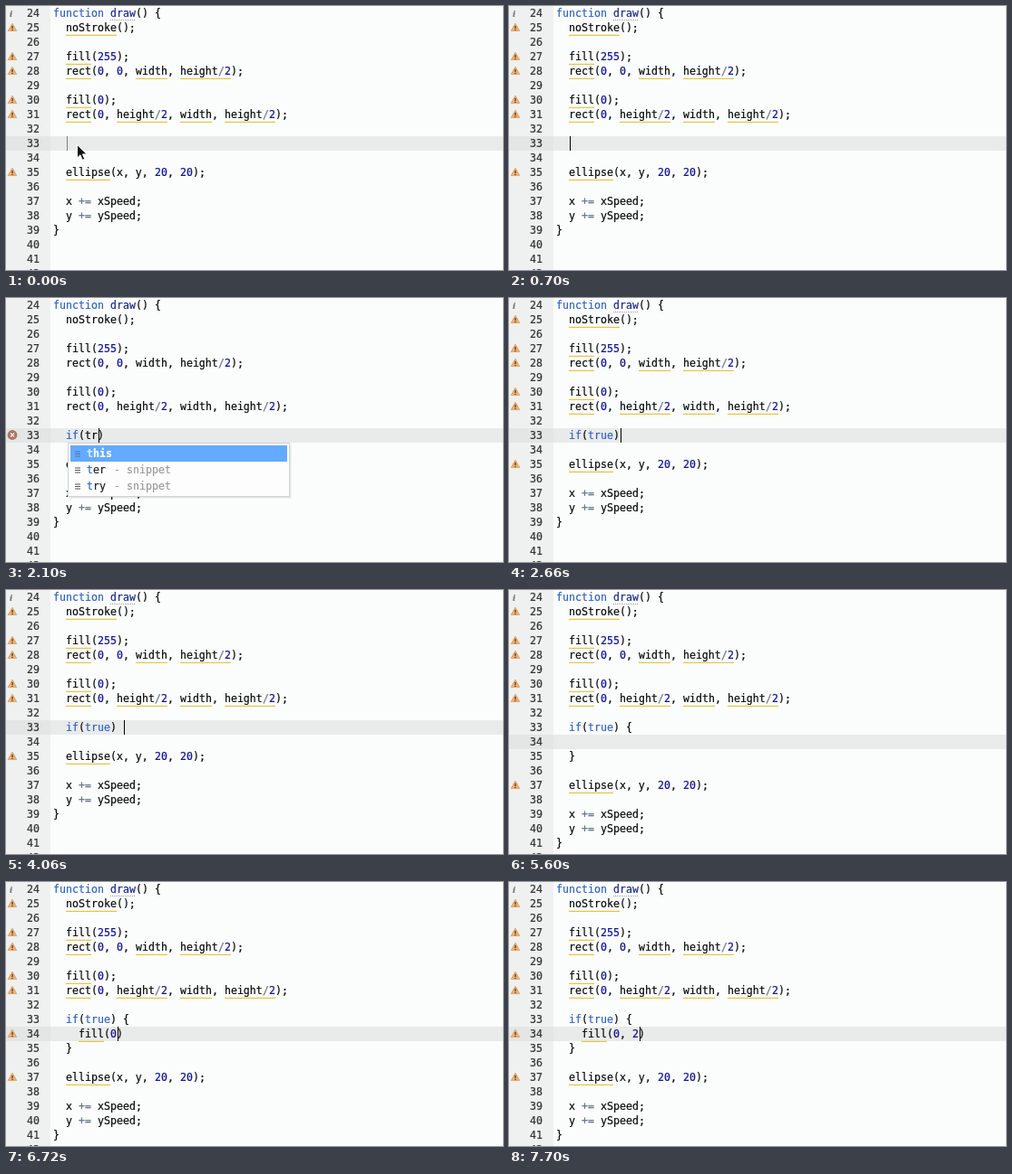
Write an HTML page that moves like this. It is 548 by 292 pixels and loops after 8 s.

```html
<!DOCTYPE html>
<html lang="en">
<head>
<meta charset="utf-8">
<title>Code editor</title>
<style>
  html, body { margin: 0; width: 100%; height: 100%; overflow: hidden; background: #fbfdfc; }
  svg { display: block; width: 548px; height: 292px; }
  text { font: 11.627px "DejaVu Sans Mono", monospace; white-space: pre; stroke-width: .2px; }
  .bold { font-weight: bold; }
  .info { font: italic bold 11px "Liberation Serif", serif; }
</style>
</head>
<body>
<svg id="stage" viewBox="0 0 548 292"></svg>
<script>
const LOOP = 8000, FIRST_ROW = 24, ROW_H = 16, CHAR_W = 7, CODE_X = 52;
const stage = document.getElementById('stage');

const HEAD = ['function draw() {', '  noStroke();', '', '  fill(255);', '  rect(0, 0, width, height/2);',
  '', '  fill(0);', '  rect(0, height/2, width, height/2);', ''];
const TAIL = ['', '  ellipse(x, y, 20, 20);', '', '  x += xSpeed;', '  y += ySpeed;', '}'];
const COLORS = { function: '#3163be', if: '#3163be', true: '#3163be', draw: '#1c2a86', '+=': '#687687', '/': '#687687' };
const TOKENS = /(\bfunction\b|\bdraw\b|\bif\b|\btrue\b|\d+|\+=|\/)/;
const FLAGGED = /noStroke|fill|rect|ellipse|width|height\/2/g;

const block = line => ['  if(true) {', '    ' + line, '  }'];
const popup = (col, matched, ...items) => ({ col, matched, items });
const ifList = popup(2, 2, 'if - EcmaScript', 'ife - snippet');
const tList = popup(5, 1, 'this', 'ter - snippet', 'try - snippet');
const trList = popup(5, 1, 'ter - snippet', 'try - snippet');
const fillList = popup(4, 2, 'fill');

// Each step changes only the listed parts of the state.
const STEPS = [
  [0, { mid: ['  '], row: 33, col: 2, caret: .45, mouse: true, list: null, error: 0, midLint: false, iconLag: 0 }],
  [140, { mouse: false, caret: .2 }],
  [280, { caret: 0 }],
  [560, { caret: .5 }],
  [700, { caret: 1 }],
  [980, { mid: ['  i'], col: 3 }],
  [1120, { mid: ['  if'], col: 4, list: ifList }],
  [1260, { error: 35 }],
  [1680, { mid: ['  if()'], col: 5, list: null }],
  [1820, { error: 33 }],
  [1960, { mid: ['  if(t)'], col: 6 }],
  [2100, { mid: ['  if(tr)'], col: 7, list: tList }],
  [2240, { mid: ['  if(tru)'], col: 8, list: trList }],
  [2380, { mid: ['  if(true)'], col: 9, list: null }],
  [2520, { col: 10 }],
  [2660, { error: 0 }],
  [3360, { caret: .5 }],
  [3500, { caret: 0 }],
  [3640, { caret: .5 }],
  [3780, { caret: 1 }],
  [4060, { mid: ['  if(true) '], col: 11 }],
  [4620, { mid: ['  if(true) {}'], col: 12 }],
  [4760, { mid: block(''), row: 34, col: 4, iconLag: 2 }],
  [5040, { iconLag: 0 }],
  [5460, { caret: .4 }],
  [5600, { caret: 0 }],
  [5740, { mid: block('f'), col: 5, caret: 1 }],
  [5880, { mid: block('fi'), col: 6, list: fillList }],
  [6020, { mid: block('fil'), col: 7 }],
  [6160, { mid: block('fill'), col: 8, list: null }],
  [6300, { mid: block('fill()'), col: 9 }],
  [6580, { mid: block('fill(0)'), col: 10 }],
  [6720, { midLint: true }],
  [7000, { mid: block('fill(0,)'), col: 11 }],
  [7280, { mid: block('fill(0, )'), col: 12, error: 34 }],
  [7560, { mid: block('fill(0, 2)'), col: 13 }],
  [7700, { error: 0 }]
];

const centerOf = row => (row - FIRST_ROW) * ROW_H + 8;
const colX = col => CODE_X + col * CHAR_W;
const rect = (x, y, w, h, fill, extra = '') =>
  `<rect x="${x}" y="${y}" width="${w}" height="${h}" fill="${fill}" ${extra}/>`;
const text = (x, y, str, color, cls = '') =>
  `<text x="${x}" y="${y}" fill="${color}" stroke="${color}" class="${cls}">${str}</text>`;

function codeLine(line, row) {
  let col = 0;
  return line.split(TOKENS).map(part => {
    const x = colX(col);
    col += part.length;
    const color = COLORS[part] || (/^\d+$/.test(part) ? '#15158f' : '#0a0a0a');
    return part.trim() ? text(x, centerOf(row) + 4, part, color) : '';
  }).join('');
}

const warningIcon = y =>
  `<path d="M7 ${y - 4.8}L11.8 ${y + 3.6}H2.2Z" fill="#e9b178" stroke="#e3a768" stroke-linejoin="round"/>` +
  rect(6.3, y - 2.2, 1.4, 3.2, '#6b4020') + rect(6.3, y + 1.8, 1.4, 1.3, '#6b4020');

const errorIcon = y =>
  `<circle cx="7" cy="${y}" r="5.4" fill="#ae7565"/>` +
  `<path d="M5 ${y - 2}l4 4m0-4l-4 4" stroke="#f6e9e5" stroke-width="1.4"/>`;

function underlines(line, row) {
  const y = centerOf(row) + 7.8;
  return [...line.matchAll(FLAGGED)].map(m =>
    rect(colX(m.index), y, m[0].length * CHAR_W, 1.2, '#e2c544')).join('');
}

function lint(state, lines) {
  if (state.error) return errorIcon(centerOf(state.error) - .5);
  let out = text(4, 12, 'i', '#777', 'info') +
    '<path d="M115 15.5h28" stroke="#999" stroke-dasharray="1 1"/>';
  lines.forEach((line, i) => {
    const row = FIRST_ROW + i;
    const inMid = row >= 33 && row < 33 + state.mid.length;
    if (!line.match(FLAGGED) || inMid && !state.midLint) return;
    out += warningIcon(centerOf(row - (row > 33 ? state.iconLag : 0))) + underlines(line, row);
  });
  return out;
}

function drawList({ col, matched, items }, row) {
  const x = colX(col) - 19, y = centerOf(row) + 8.5, h = items.length * 18 + 5;
  let out = rect(x + 1.5, y + 2, 245, h, '#000', 'opacity=".09"') +
    rect(x + .5, y, 244, h, '#fdfdfd', 'stroke="#d0d2d2"') +
    rect(x + 3, y + 2.5, 239, 18, '#64aaff');
  items.forEach((item, i) => {
    const [word, meta] = item.split(' - '), mid = y + 11.5 + i * 18, chosen = i === 0;
    const cls = chosen ? 'bold' : '', wx = x + 21, base = mid + 4;
    if (!(chosen && meta))
      for (const dy of [-2.5, 0, 2.5]) out += rect(x + 8, mid + dy, 6, 1, chosen ? '#4b78a8' : '#555');
    out += text(wx, base, word.slice(0, matched), chosen ? '#d3e7ff' : '#2d69c7', cls) +
      text(wx + matched * CHAR_W, base, word.slice(matched), chosen ? '#fff' : '#222', cls);
    if (meta) out += text(wx + word.length * CHAR_W + 9, base, '- ' + meta, chosen ? '#a9d1ff' : '#999', cls);
  });
  return out;
}

const pointer = '<path d="M78.5 153.5v14.5l3.4-3.2 2.4 5.5 2.5-1.1-2.4-5.3h4.8Z" fill="#111" stroke="#fff"/>';

function draw(state) {
  const lines = [...HEAD, ...state.mid, ...TAIL], y = centerOf(state.row);
  let out = rect(0, 0, 548, 292, '#fbfdfc') + rect(0, 0, 49, 292, '#eff1f1') +
    rect(0, y - 8, 49, 16, '#e4e5e5') + rect(49, y - 8, 499, 16, '#e9eaea');
  for (let row = FIRST_ROW; row <= 42; row++) out += text(23, centerOf(row) + 4, row, '#333');
  out += lines.map((line, i) => codeLine(line, FIRST_ROW + i)).join('') + lint(state, lines);
  out += rect(colX(state.col) + 1, y - 8, 1, 16, '#000', `opacity="${state.caret}"`);
  if (state.list) out += drawList(state.list, state.row);
  if (state.mouse) out += pointer;
  stage.innerHTML = out;
}

let shown = -1;
const start = performance.now();
function tick() {
  const t = (performance.now() - start) % LOOP;
  const index = STEPS.filter(([at]) => at <= t).length - 1;
  if (index !== shown) {
    shown = index;
    draw(Object.assign({}, ...STEPS.slice(0, index + 1).map(([, change]) => change)));
  }
  requestAnimationFrame(tick);
}
tick();
</script>
</body>
</html>
```
